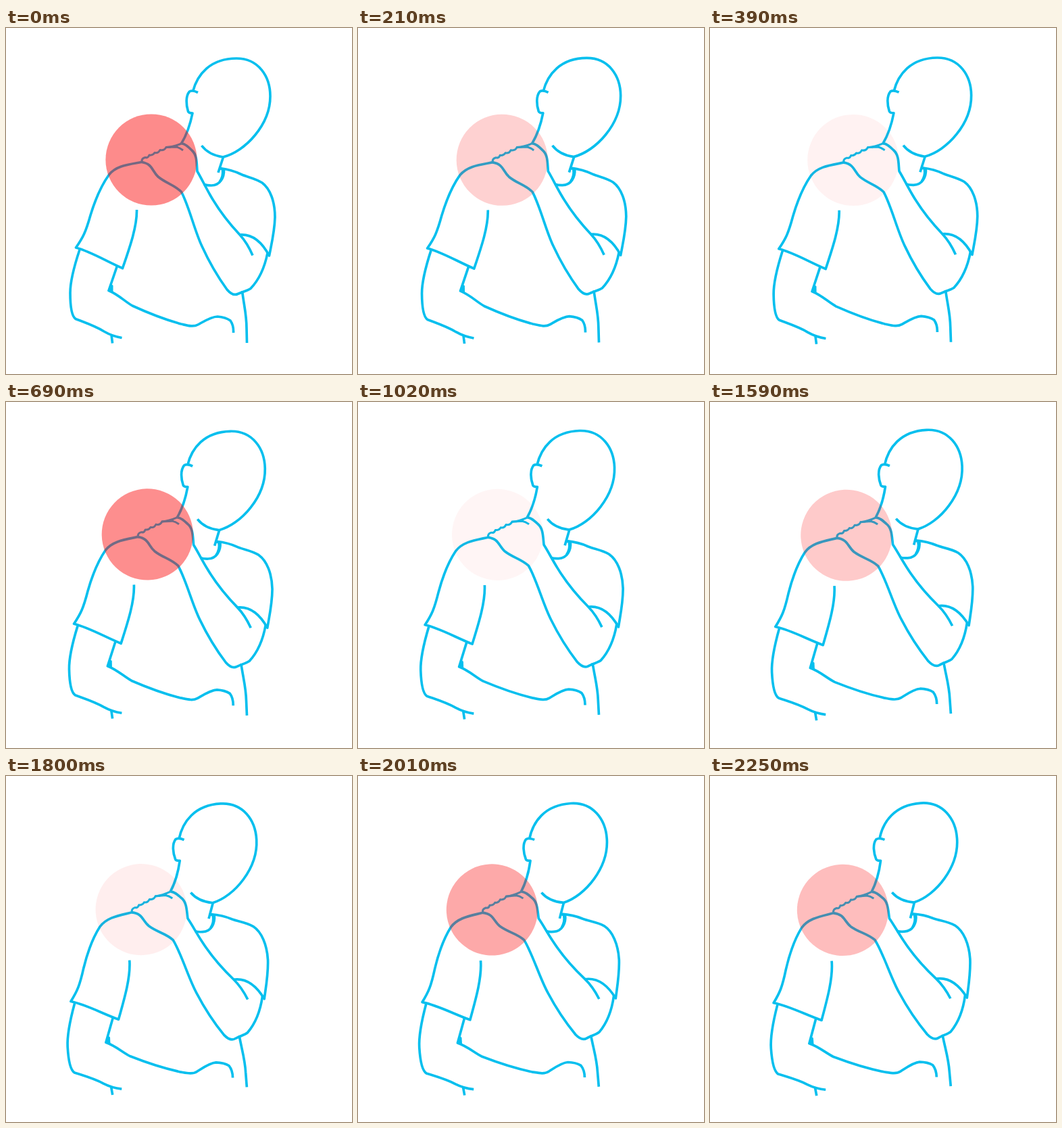
Recreate the animation shown at these times as an HTML page. Size 512 px wide and 512 px high, loop 2280 ms.

```html
<!DOCTYPE html>
<html lang="en">
<head>
<meta charset="utf-8">
<title>Shoulder pain</title>
<style>
  html, body { margin: 0; width: 100%; height: 100%; overflow: hidden; background: #fff; }
  svg { display: block; width: 100vw; height: 100vh; }
  .lines { fill: none; stroke: #06bfee; stroke-width: 3.7; stroke-linejoin: round; }
  .solid { fill: #06bfee; stroke: none; }
  #pain { fill: #fa0000; fill-opacity: .455; }
</style>
</head>
<body>
<svg viewBox="0 0 512 512">
  <g id="figure">
    <g class="lines">
      <!-- head and ear -->
      <path d="M276.500 94C283 69 302 45 341 45C374 45 391 72 391 101C391 143 354 183 321 191C308 189 297 184 289.500 174"/>
      <path d="M284 95.500C280 93.500 275 92 271.500 94C265.500 101 266.500 114 269.500 123.500C270.500 126 273 126 276 126C273 141 268 157 259.500 171"/>
      <!-- collar -->
      <path d="M321.500 191L314 214"/>
      <path d="M315 207.500L322.500 209.500C323 221 317 233 304 233Q297 233 293 231.500"/>
      <path d="M320.500 210Q322 219 316 228"/>
      <!-- right shoulder and sleeve -->
      <path d="M317 207.500C328 209 339 212 348 216.500C358 221 368 222 379 229C391 238 398 257 398 280C397.500 301 393 319 389.500 337C379 317 365 304 345 306"/>
      <!-- hand and raised arm -->
      <path stroke-width="3" d="M201 198.500Q200 193 206 191.500Q210 193 212 188Q217 189 220 184.500Q225 186 228 180.500Q234 182 237 176.500Q247 176 259.500 171"/>
      <path stroke-width="3" d="M236 176.500L252 176Q257 177 262 181M243 176.500L254 174.500"/>
      <path d="M259.500 171C265 171 270 176 275 181C283 188 282 200 283 212C290 224 294 233 302 247C315 270 331 290 346 306Q357 318 365 336.500"/>
      <path d="M201 198.500C217 201 216 212 225 220C237 230 249 232 259.500 242.500C271 264 279 300 290 323C300 345 314 369 327 387C333 394 338 396 343 393.500C350 390 357 389 362 385.500C373 374 382 358 387 333"/>
      <!-- left shoulder and sleeve -->
      <path d="M203 198C183 202 164 203 152.500 217C141 233 132 254 125 277C118 302 114 310 103.500 325C126 331 150 346 172.500 355.500C183 325 194 294 193.500 269"/>
      <!-- left arm -->
      <path d="M109 328C100 355 95 375 95 392C95 414 98 427 103 430.500C117 436 132 441 145 449Q157 456 171.500 458.500M156 454L157.500 466.500"/>
      <!-- shirt -->
      <path d="M164.500 352L152 388.500C167 395 175 404 187 411C211 422 237 432 259 438C268 440 277 443 284 439C293 434 304 427 313 427Q325 428 332 433Q337 440 336.500 451"/>
      <path d="M349.500 389C352 410 356 424 356 444L356.500 466"/>
      <path class="solid" d="M155 378L158.500 381L158.500 391L150.500 389Z"/>
    </g>
    <circle id="pain" cx="215" cy="195" r="67.600"/>
  </g>
</svg>
<script>
  const LOOP = 2280, STEP = 30, PULSE = 700, TILT = 4;
  const figure = document.getElementById('figure');
  const pain = document.getElementById('pain');

  function draw(now) {
    const t = Math.floor((now % LOOP) / STEP) * STEP;
    const glow = Math.abs(1 - 2 * (t % PULSE) / PULSE);
    figure.setAttribute('transform', `rotate(${-TILT * t / LOOP} 255 466)`);
    pain.setAttribute('opacity', glow);
    requestAnimationFrame(() => draw(performance.now()));
  }
  draw(0);
</script>
</body>
</html>
```
